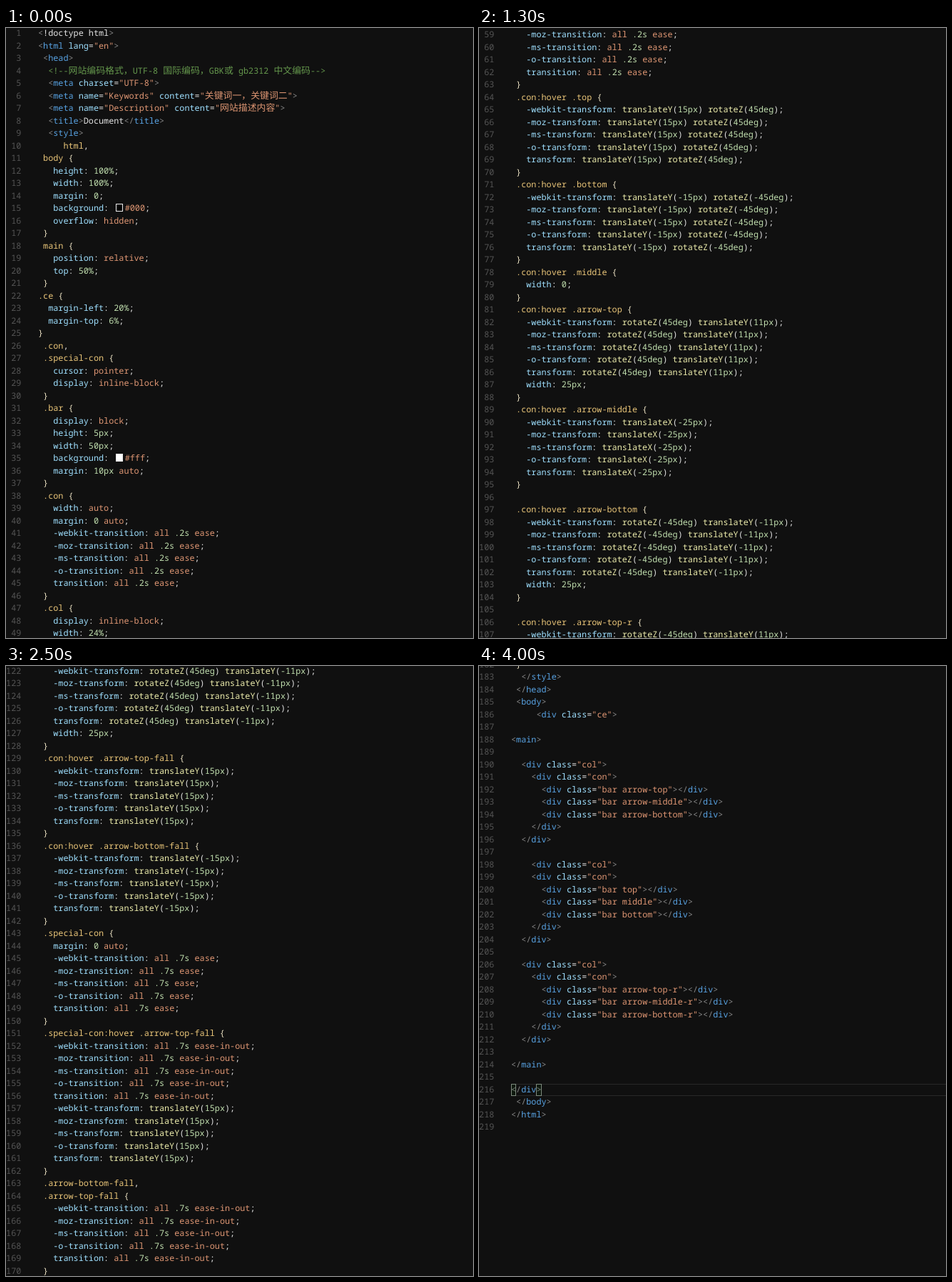
Animation, 655 px wide and 854 px high, one loop 4200 ms. Source, as an HTML page:

```html
<!DOCTYPE html>
<html lang="zh-CN">
<head>
<meta charset="UTF-8">
<title>Code scroll</title>
<style>
  html, body { margin: 0; width: 100%; height: 100%; overflow: hidden; background: #101010; }
  #stage { position: relative; width: 100%; height: 100%; overflow: hidden; contain: strict; }
  #code {
    position: absolute; left: 0; top: -1px; width: 100%;
    font: 500 11.816px/17.5px "Noto Sans Mono", "DejaVu Sans Mono", monospace;
    font-variant-ligatures: none; text-rendering: geometricPrecision;
    color: #e2e2e2; white-space: pre;
  }
  .line { position: absolute; left: 45px; right: 0; height: 17.5px; }
  .num { position: absolute; left: -54px; width: 30.3px; text-align: right; color: #545454; font-weight: 400; }
  .cjk { font: 400 12.9px/0 "Noto Sans CJK SC", "Noto Sans CJK", sans-serif; }
  .punct { color: #868686; }
  .tag { color: #58a2e2; }
  .attr, .prop { color: #9fe0ff; }
  .str, .word, .hex { color: #de9673; }
  .comment { color: #64964c; }
  .sel { color: #e8c478; }
  .brace { color: #ece2c4; }
  .fn { color: #ececac; }
  .val { color: #c0deae; }
  .swatch {
    display: inline-block; box-sizing: border-box; width: 10.3px; height: 10.3px;
    margin: 0 2.6px; border: 1.3px solid #eee; vertical-align: -0.6px;
  }
  .current::before {
    content: ""; position: absolute; inset: 0; box-sizing: border-box;
    border: solid #282828; border-width: 1.8px 0;
  }
  .match {
    position: absolute; top: 0; width: 7.1px; height: 17.5px; box-sizing: border-box;
    border: 1px solid #7d8a7d; background: rgba(0, 100, 0, .1);
  }
</style>
</head>
<body>
<div id="stage"><div id="code"></div></div>
<script>
const PITCH = 17.5, CHAR = 7.09, TICK = 92.1, LOOP = 4200;

// [time in ms, scroll position in wheel ticks]
const STEPS = [
  [0, 0], [100, 1.5], [500, 3.5], [600, 4.5], [800, 5], [1000, 7.5], [1100, 9.5],
  [1300, 11], [1500, 12.5], [1600, 13.5], [1700, 15], [1800, 16], [2000, 17.5],
  [2200, 19.5], [2300, 21], [2500, 23], [2700, 24.5], [2800, 25.5], [2900, 27],
  [3000, 28], [3200, 30], [3400, 31.5], [3500, 32], [3700, 32.5], [3900, 33.5], [4000, 34.5]
];

const rule = (selector, ...decls) =>
  [` ${selector} {`, ...decls.flat().map(d => `   ${d};`), ' }'];
const prefixed = (prop, value) =>
  ['-webkit-', '-moz-', '-ms-', '-o-', ''].map(p => `${p}${prop}: ${value}`);
const move = value => prefixed('transform', value);
const ease = value => prefixed('transition', `all ${value}`);
const hover = (name, ...decls) => rule(`.con:hover .${name}`, ...decls);

const column = (indent, ...names) => [
  `${indent}<div class="col">`,
  '    <div class="con">',
  ...names.map(n => `      <div class="bar ${n}"></div>`),
  '    </div>',
  '  </div>',
  ''
];

const css = [
  '     html,',
  ...rule('body', 'height: 100%', 'width: 100%', 'margin: 0', 'background: #000', 'overflow: hidden'),
  ...rule('main', 'position: relative', 'top: 50%'),
  '.ce {', '  margin-left: 20%;', '  margin-top: 6%;', '}',
  ' .con,',
  ...rule('.special-con', 'cursor: pointer', 'display: inline-block'),
  ...rule('.bar', 'display: block', 'height: 5px', 'width: 50px', 'background: #fff', 'margin: 10px auto'),
  ...rule('.con', 'width: auto', 'margin: 0 auto', ease('.2s ease')),
  ...rule('.col', 'display: inline-block', 'width: 24%', 'text-align: center', 'height: auto', 'position: relative'),
  ...rule('.middle', 'margin: 0 auto'),
  ...rule('.bar', ease('.2s ease')),
  ...hover('top', move('translateY(15px) rotateZ(45deg)')),
  ...hover('bottom', move('translateY(-15px) rotateZ(-45deg)')),
  ...hover('middle', 'width: 0'),
  ...hover('arrow-top', move('rotateZ(45deg) translateY(11px)'), 'width: 25px'),
  ...hover('arrow-middle', move('translateX(-25px)')),
  '',
  ...hover('arrow-bottom', move('rotateZ(-45deg) translateY(-11px)'), 'width: 25px'),
  '',
  ...hover('arrow-top-r', move('rotateZ(-45deg) translateY(11px)'), 'width: 25px'),
  ...hover('arrow-middle-r', move('translateX(25px)')),
  ...hover('arrow-bottom-r', move('rotateZ(45deg) translateY(-11px)'), 'width: 25px'),
  ...hover('arrow-top-fall', move('translateY(15px)')),
  ...hover('arrow-bottom-fall', move('translateY(-15px)')),
  ...rule('.special-con', 'margin: 0 auto', ease('.7s ease')),
  ...rule('.special-con:hover .arrow-top-fall', ease('.7s ease-in-out'), move('translateY(15px)')),
  ' .arrow-bottom-fall,',
  ...rule('.arrow-top-fall', ease('.7s ease-in-out')),
  ...rule('.special-con:hover .arrow-bottom-fall', move('translateY(-15px)'), ease('.7s ease-in-out'))
];

const lines = [
  '<!doctype html>',
  '<html lang="en">',
  ' <head>',
  '  <\!--网站编码格式\uff0cUTF-8 国际编码\uff0cGBK或 gb2312 中文编码-->',
  '  <meta charset="UTF-8">',
  '  <meta name="Keywords" content="关键词一\uff0c关键词二">',
  '  <meta name="Description" content="网站描述内容">',
  '  <title>Document</title>',
  '  <style>',
  ...css,
  '  </style>',
  ' </head>',
  ' <body>',
  '     <div class="ce">',
  '',
  '<main>',
  '',
  ...column('  ', 'arrow-top', 'arrow-middle', 'arrow-bottom'),
  ...column('    ', 'top', 'middle', 'bottom'),
  ...column('  ', 'arrow-top-r', 'arrow-middle-r', 'arrow-bottom-r'),
  '</main>',
  '',
  '</div>',
  ' </body>',
  '</html>',
  ''
];

const HTML = /(?<comment><!--.*-->)|(?<str>"[^"]*")|(?<attr>\w+(?==))|(?<tag>(?<=<\/?)\w+)|(?<punct><\/?|>)/g;
const SELECTOR = /(?<brace>[{}])|(?<sel>[.\w][^{},]*(?=[ ,]))/g;
const DECL = /(?<prop>(?<=^ +)[\w-]+(?=:))|(?<hex>#\w+)|(?<fn>\w+(?=\())|(?<val>-?[\d.]+[a-z%]*)|(?<word>[a-z][\w-]*)/g;
const WIDE = /([\u3000-\uffff]+)/;

function add(parent, cls, text = '') {
  const el = document.createElement('span');
  el.className = cls;
  el.textContent = text;
  parent.append(el);
  return el;
}

// Wide characters keep their own size
function addToken(row, cls, text) {
  const el = add(row, cls);
  for (const part of text.split(WIDE)) {
    if (WIDE.test(part)) add(el, 'cjk', part);
    else el.append(part);
  }
}

function paint(row, text) {
  const grammar = text.includes('<') ? HTML : text.endsWith(';') ? DECL : SELECTOR;
  let end = 0;
  for (const m of text.matchAll(grammar)) {
    row.append(text.slice(end, m.index));
    const kind = Object.keys(m.groups).find(k => m.groups[k] !== undefined);
    if (kind === 'hex') add(row, 'swatch').style.background = m[0];
    addToken(row, kind, m[0]);
    end = m.index + m[0].length;
  }
  row.append(text.slice(end));
}

const code = document.getElementById('code');
const rows = lines.map((text, i) => {
  const row = document.createElement('div');
  row.className = 'line';
  row.style.top = i * PITCH + 'px';
  add(row, 'num', String(i + 1));
  paint(row, text);
  if (text === '</div>') {
    row.classList.add('current');
    for (const col of [0, 5]) add(row, 'match').style.left = col * CHAR + 'px';
  }
  return row;
});

// Only the rows in view stay in the page
let shown = -1;
function scrollTo(ticks) {
  if (ticks === shown) return;
  shown = ticks;
  const y = Math.round(ticks * TICK);
  const first = Math.max(0, Math.floor(y / PITCH) - 1);
  code.replaceChildren(...rows.slice(first, Math.ceil((y + innerHeight) / PITCH) + 1));
  code.style.transform = `translateY(${-y}px)`;
}

const start = performance.now();
function frame() {
  const t = (performance.now() - start) % LOOP;
  scrollTo(STEPS.findLast(([time]) => time <= t)[1]);
  requestAnimationFrame(frame);
}
frame();
</script>
</body>
</html>
```
